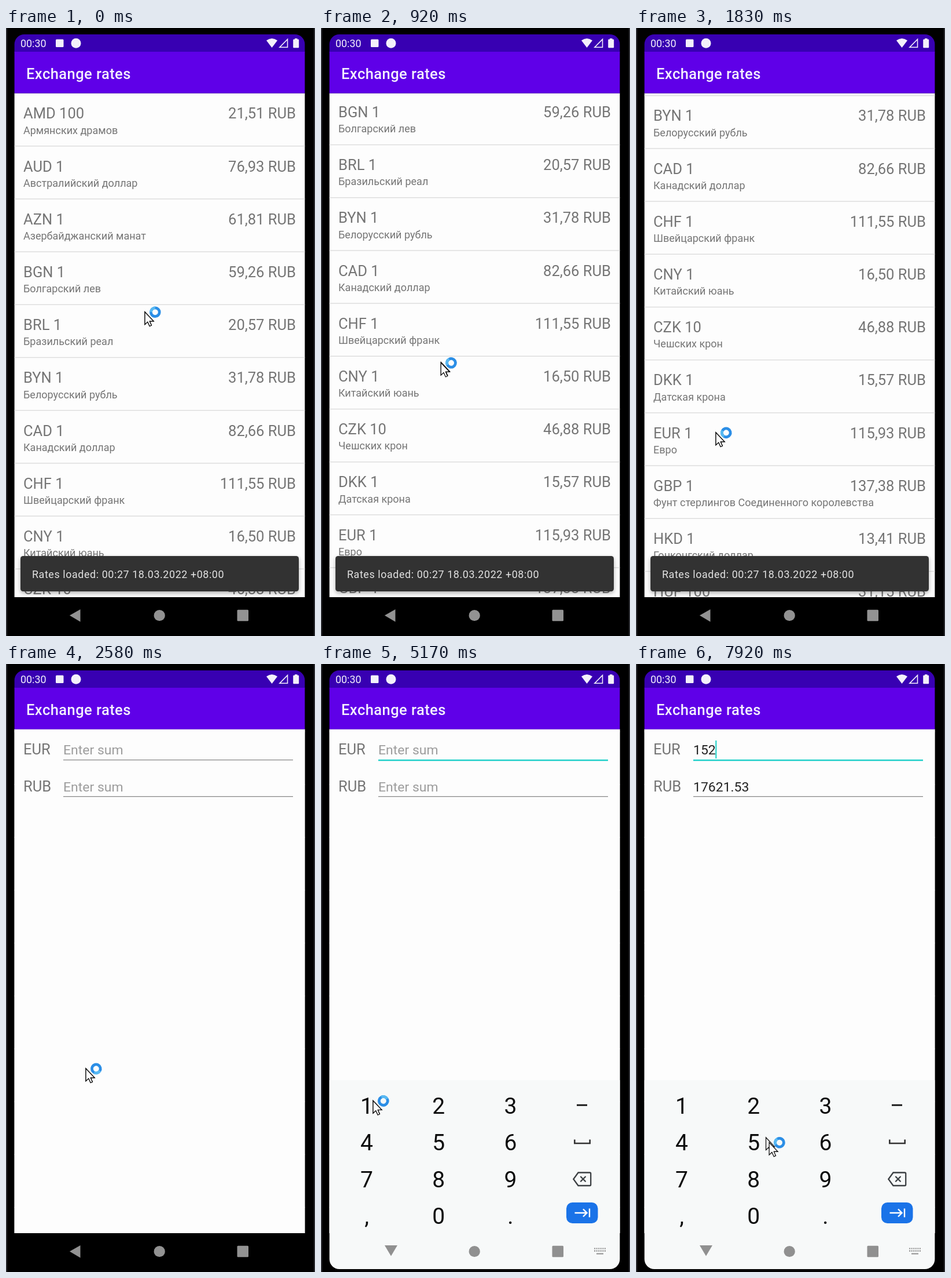
An HTML page for the animation above (8 s loop, 534 by 1049 pixels).

```html
<!DOCTYPE html>
<html lang="en">
<head>
<meta charset="utf-8">
<title>Exchange rates</title>
<style>
html, body { margin: 0; width: 100%; height: 100%; overflow: hidden; background: #000; }
svg { display: block; width: 534px; height: 1049px; font-family: Roboto, sans-serif; }
.big { font-size: 25.54px; fill: #757575; }
.name { font-size: 18.03px; fill: #757575; }
.field { font-size: 22.98px; }
.key { font-size: 39px; fill: #0c0c0c; text-anchor: middle; }
.end { text-anchor: end; }
</style>
</head>
<body>
<svg viewBox="0 0 534 1049">
  <defs>
    <clipPath id="screen"><rect x="14.6" y="11" width="501.8" height="1033" rx="17"/></clipPath>
    <clipPath id="body"><rect x="14" y="112.6" width="503" height="869.4"/></clipPath>
    <filter id="shade" x="-5%" y="-20%" width="110%" height="150%">
      <feDropShadow dx="0" dy="3" stdDeviation="3.5" flood-opacity=".3"/>
    </filter>
    <path id="arrow" d="M0 0V21.5L4.8 17L8.2 24.5L11.4 23L8.2 15.8H15Z" fill="#fdfdfd" stroke="#111" stroke-width="1.3"/>
  </defs>

  <rect width="534" height="1049" fill="#2c2d31"/>
  <rect x="2" width="530" height="1049" fill="#000"/>

  <g clip-path="url(#screen)">
    <g clip-path="url(#body)">
      <rect x="14" y="112" width="503" height="870" fill="#fdfdfd"/>
      <g id="list"></g>
      <g filter="url(#shade)"><rect x="25" y="911" width="481" height="61" rx="4.5" fill="#323232"/></g>
      <text x="45" y="949" font-size="17.88" letter-spacing=".6" fill="#e2e2e2">Rates loaded: 00:27 18.03.2022 +08:00</text>
      <g id="form">
        <rect x="14" y="112" width="503" height="870" fill="#fdfdfd"/>
        <text class="big" x="30" y="156.3">EUR</text>
        <text class="big" x="30" y="220">RUB</text>
        <text class="field" id="eur" x="99" y="156.3"></text>
        <text class="field" id="rub" x="99" y="219.6"></text>
        <rect id="line" x="99" width="397"/>
        <rect x="99" y="228" width="397" height="1.3" fill="#8a8a8a"/>
        <rect id="caret" y="132" width="2" height="31" fill="#18cfc6"/>
      </g>
    </g>

    <rect x="14" y="11" width="503" height="31" fill="#3800b2"/>
    <rect x="14" y="41" width="503" height="71.6" fill="#5f00e8"/>
    <text x="35" y="87.5" font-size="25.54" font-weight="500" letter-spacing=".42" fill="#f4f0fd">Exchange rates</text>
    <g fill="#f3f0fb">
      <text x="25" y="33" font-size="17.9">00:30</text>
      <rect x="86" y="19.5" width="13.5" height="13.5" rx="1.5"/>
      <circle cx="121" cy="26.3" r="8.5"/>
      <path d="M450 21.5Q459.5 14.5 469 21.5L459.5 34Z"/>
      <path d="M486.5 19.5V33.2H473Z" fill="none" stroke="#f3f0fb" stroke-width="1.6"/>
      <path d="M499 18H503.5V19.6H505.2Q506.2 19.6 506.2 20.8V33Q506.2 34.3 505 34.3H497.4Q496.2 34.3 496.2 33V20.8Q496.2 19.6 497.4 19.6H499Z"/>
    </g>

    <rect x="14" y="982" width="503" height="67" fill="#000"/>
    <g fill="#929292">
      <path d="M110 1013.5L128.5 1003V1024.5Z"/>
      <circle cx="265.2" cy="1013.5" r="9.6"/>
      <rect x="399.5" y="1003.8" width="19.5" height="19.5" rx="1.5"/>
    </g>

    <g id="pad">
      <rect x="14" y="718" width="503" height="330" fill="#f7f9f9"/>
      <rect id="press" width="124" height="63" fill="#dedfe1"/>
      <g id="keys"></g>
      <rect x="442" y="759.7" width="18" height="2.8" fill="#111"/>
      <path d="M438.3 820.5V827H464.7V820.5" fill="none" stroke="#333" stroke-width="2.6"/>
      <g fill="none" stroke="#3c4043" stroke-width="2.3">
        <path d="M444.5 877.5H464.5Q466.2 877.5 466.2 879.2V898.3Q466.2 900 464.5 900H444.5L436.3 888.7Z"/>
        <path d="M448.3 884L457.5 893.3M457.5 884L448.3 893.3"/>
      </g>
      <rect x="424" y="929" width="54.5" height="36" rx="10.5" fill="#1a73e8"/>
      <path d="M438.5 947H459M453 940.5L459.5 947L453 953.5M464 939.5V954.5" fill="none" stroke="#fff" stroke-width="2.4"/>
      <g fill="#909090">
        <path d="M110 1003H132L121 1021.5Z"/>
        <circle cx="265.2" cy="1013.5" r="9.6"/>
        <rect x="399.5" y="1003.8" width="19.5" height="19.5" rx="1.5"/>
      </g>
      <path d="M472 1008.5H492M472 1012.7H492" stroke="#909090" stroke-width="2.2" stroke-dasharray="2.2 1.36"/>
      <path d="M476 1017.5H488" stroke="#909090" stroke-width="2"/>
    </g>
  </g>

  <use id="trail" href="#arrow"/>
  <use id="tip" href="#arrow"/>
  <g id="ring" fill="none" stroke-width="4.8">
    <circle r="7.4" stroke="#2b8ee6"/>
    <path d="M-7.4 0A7.4 7.4 0 0 1 0 -7.4" stroke="#58b9f2"/>
  </g>
</svg>
<script>
const LOOP = 8000, PITCH = 91.2;
const $ = id => document.getElementById(id);
const set = (el, attrs) => { for (const k in attrs) el.setAttribute(k, attrs[k]); };
const move = (el, x, y, more = '') => el.setAttribute('transform', `translate(${x} ${y})${more}`);
const part = (t, a, b) => Math.min(1, Math.max(0, (t - a) / (b - a)));
const smooth = u => u * u * (3 - 2 * u);
const easeOut = u => 1 - (1 - u) ** 2;

function add(parent, tag, attrs, text = '') {
  const el = document.createElementNS('http://www.w3.org/2000/svg', tag);
  el.textContent = text;
  set(el, attrs);
  parent.append(el);
}

const rates = `AMD 100|21,51|Армянских драмов
AUD 1|76,93|Австралийский доллар
AZN 1|61,81|Азербайджанский манат
BGN 1|59,26|Болгарский лев
BRL 1|20,57|Бразильский реал
BYN 1|31,78|Белорусский рубль
CAD 1|82,66|Канадский доллар
CHF 1|111,55|Швейцарский франк
CNY 1|16,50|Китайский юань
CZK 10|46,88|Чешских крон
DKK 1|15,57|Датская крона
EUR 1|115,93|Евро
GBP 1|137,38|Фунт стерлингов Соединенного королевства
HKD 1|13,41|Гонконгский доллар
HUF 100|31,15|Венгерских форинтов`;

rates.split('\n').forEach((row, i) => {
  const [code, rate, name] = row.split('|');
  const top = 113 + i * PITCH, list = $('list');
  add(list, 'text', { class: 'big', x: 30, y: top + 43.3 }, code);
  add(list, 'text', { class: 'big end', x: 501, y: top + 43.3 }, rate + ' RUB');
  add(list, 'text', { class: 'name', x: 30, y: top + 69.5 }, name);
  add(list, 'rect', { x: 14, y: top + 90, width: 503, height: 1.4, fill: '#dcdcdc' });
});

[...'123456789,0.'].forEach((c, i) =>
  add($('keys'), 'text', { class: 'key', x: 79 + (i % 3) * 124.2, y: 775.6 + Math.floor(i / 3) * 63.6 }, c));

// time, x, y of the pointer
const path = [
  [0, 240, 490], [100, 240, 490], [960, 207, 578], [1750, 138, 698], [2880, 138, 698],
  [3720, 212, 157], [4400, 212, 157], [5120, 90, 753.5], [5640, 90, 753.5],
  [6140, 183, 818], [6500, 183, 818], [7020, 195, 772], [7750, 195, 772], [8000, 241, 842]
];

function pointer(t) {
  const i = Math.max(1, path.findIndex(p => p[0] >= t));
  const [a, x, y] = path[i - 1], [b, x2, y2] = path[i];
  const u = smooth(part(t, a, b));
  return [x + (x2 - x) * u, y + (y2 - y) * u];
}

// start of caret blink, amount, result
const typed = [[4200, '', ''], [5575, '1', '115.93'], [6495, '15', '1738.97'], [7662, '152', '17621.53']];
// key column, key row, down, up
const presses = [[0, 0, 5240, 5575], [1, 1, 6150, 6415], [1, 0, 7245, 7662]];

function fill(el, text) {
  el.textContent = text || 'Enter sum';
  el.setAttribute('fill', text ? '#222' : '#9d9d9d');
}

function draw(t) {
  move($('list'), 0, -(275.8 * easeOut(part(t, 40, 900)) + 176 * easeOut(part(t, 930, 1740))));
  $('form').setAttribute('opacity', smooth(part(t, 2170, 2340)));

  const focused = t >= 4200;
  const [since, sum, result] = typed.filter(s => s[0] <= t).pop() || typed[0];
  fill($('eur'), sum);
  fill($('rub'), result);
  const caretOn = focused && (t - since) % 1000 < 500;
  set($('caret'), { x: 98.6 + sum.length * 12.9, opacity: caretOn ? 1 : 0 });
  set($('line'), focused
    ? { y: 164.8, height: 2.5, fill: '#1fcfc9' }
    : { y: 164.9, height: 1.3, fill: '#8a8a8a' });

  move($('pad'), 0, 335 * (1 - easeOut(part(t, 4200, 4450))));
  const down = presses.find(p => t >= p[2] && t < p[3]);
  $('press').setAttribute('opacity', down ? 1 : 0);
  if (down) set($('press'), { x: 17 + down[0] * 124, y: 728 + down[1] * 63.6 });

  const [x, y] = pointer(t);
  move($('trail'), ...pointer(Math.max(0, t - 22)));
  move($('tip'), x, y);
  move($('ring'), x + 17.8, y + .3, ` rotate(${t * .36})`);
}

function tick() {
  draw(performance.now() % LOOP);
  requestAnimationFrame(tick);
}
tick();
</script>
</body>
</html>
```
